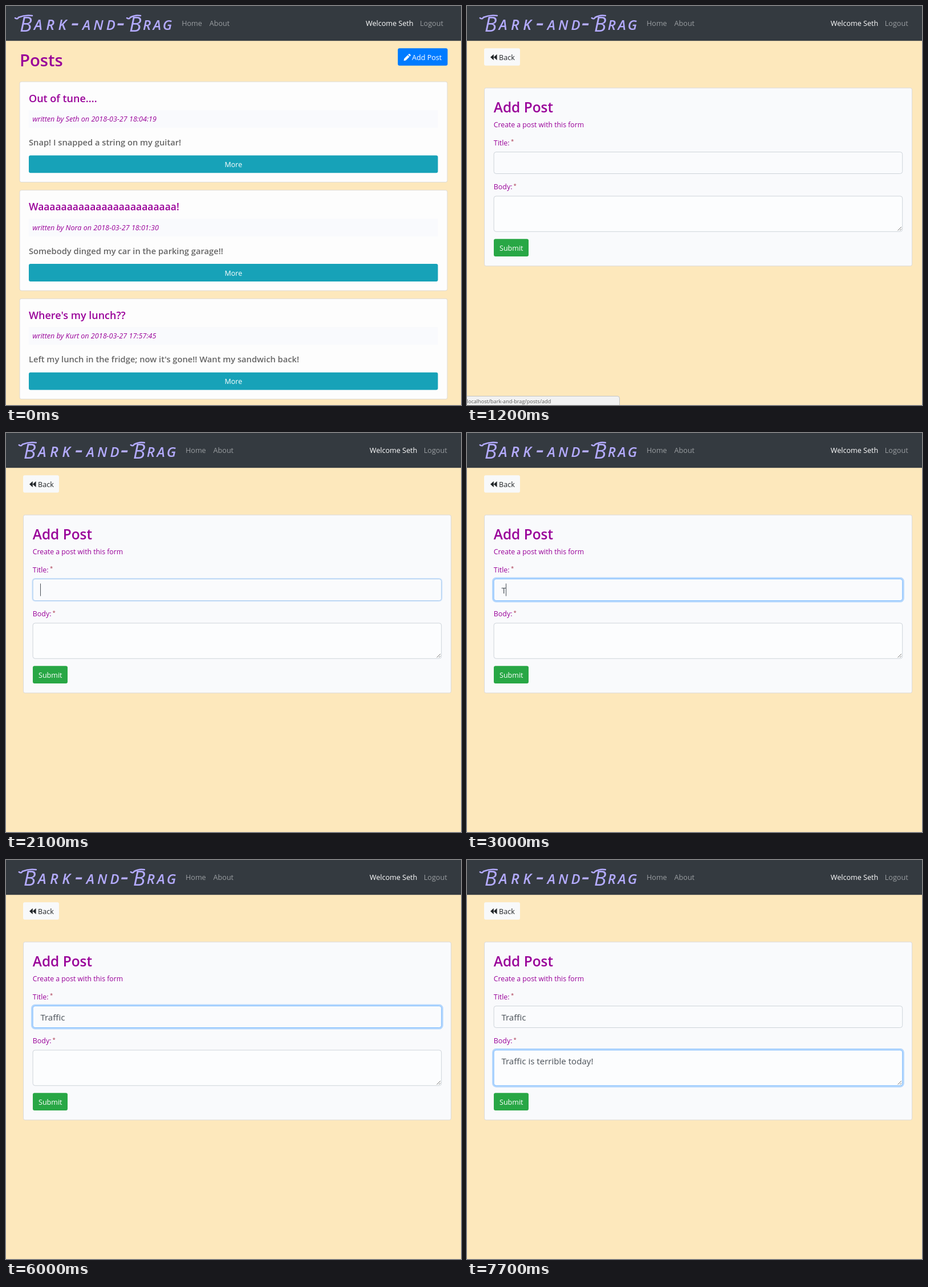
Write an HTML page that moves like this. It is 798 px wide and 701 px high and loops after 8 s.

```html
<!DOCTYPE html>
<html lang="en">
<head>
<meta charset="utf-8">
<title>Posts</title>
<style>
  html, body { margin: 0; width: 100%; height: 100%; overflow: hidden; background: #fde8bc; }
  svg { display: block; width: 100vw; height: 100vh; }
  text { font-family: "Open Sans", "Noto Sans", sans-serif; font-variant-ligatures: none; white-space: pre; }
</style>
</head>
<body>
<svg id="stage" viewBox="0 0 798 701"></svg>
<script>
const PURPLE = '#990099', WHITE = '#fff', INK = '#495057';
const LOOP = 8000, STEP = 100;

const rect = (x, y, w, h, fill, r = 0, more = '') =>
  `<rect x="${x}" y="${y}" width="${w}" height="${h}" rx="${r}" fill="${fill}" ${more}/>`;
const text = (x, y, size, fill, str, more = '') =>
  `<text x="${x}" y="${y}" font-size="${size}" fill="${fill}" ${more}>${str}</text>`;
const bold = 'font-weight="600"';

function brand() {
  const part = (x, y, size, gap, str, weight = 600) =>
    `<tspan x="${x}" y="${y}" font-size="${size}" letter-spacing="${gap}" font-weight="${weight}">${str}</tspan>`;
  const swash = (x, y, w) =>
    `<path d="M${x} ${y + 4}q4 3 6 -1q${w / 2} -5 ${w} -3" fill="none" stroke="#b4abff" stroke-width="2.6" stroke-linecap="round"/>`;
  return `<text fill="#b4abff" font-style="italic">` +
    part(24, 45, 36, 0, 'B', 400) + part(49, 42, 25, 6.5, 'ARK') + part(114, 45, 46, 0, '-', 400) +
    part(134, 42, 24, 5, 'AND') + part(194, 45, 46, 0, '-', 400) +
    part(216, 45, 36, 0, 'B', 400) + part(240, 42, 24, 3.5, 'RAG') + '</text>' +
    swash(16, 17, 24) + swash(212, 17, 18);
}

function nav() {
  const link = (x, str, fill = '#999da0') => text(x, 35, 12.6, fill, str);
  return brand() + link(308.2, 'Home') + link(356.8, 'About') +
    link(631, 'Welcome Seth', WHITE) + link(726, 'Logout');
}

function card(i, title, size, meta, body) {
  return `<g transform="translate(0 ${i * 190.6})">` +
    rect(24, 133, 750, 176.5, '#fdfdfd', 3, 'stroke="#dfdbd3"') +
    text(40, 168.5, size, PURPLE, title, bold) +
    rect(40, 183, 717.5, 31, '#f9fafd') +
    text(46.4, 203, 12.6, PURPLE, 'written by ' + meta, 'font-style="italic"') +
    text(40, 245, 14.7, '#666', body, bold) +
    rect(40, 262.5, 717.5, 30.8, '#17a2b8', 3) +
    text(398.8, 283, 12.5, WHITE, 'More', 'text-anchor="middle"') + '</g>';
}

function listPage() {
  const pencil = '<path d="M697.5 96.3l.8 -3.9l6.2 -6.2l3.1 3.1l-6.2 6.2zM705.3 85.4l1.2 -1.2q.8 -.6 1.5 0l1.6 1.6q.6 .8 0 1.5l-1.2 1.2z" fill="#fff"/>';
  return text(24, 106, 29.2, PURPLE, 'Posts', bold) +
    rect(687.2, 74.2, 87.3, 30.6, '#007bff', 3, 'id="add"') +
    pencil + text(712, 94.8, 12.6, WHITE, 'Add Post') +
    card(0, 'Out of tune....', 18, 'Seth on 2018-03-27 18:04:19', 'Snap! I snapped a string on my guitar!') +
    card(1, 'W' + 'a'.repeat(24) + '!', 17.45, 'Nora on 2018-03-27 18:01:30', 'Somebody dinged my car in the parking garage!!') +
    card(2, "Where's my lunch??", 18, 'Kurt on 2018-03-27 17:57:45', "Left my lunch in the fridge; now it's gone!! Want my sandwich back!");
}

function field(id, y, h, fill) {
  return rect(47.1, y, 716.6, h, fill, 4, `id="${id}Ring" stroke="#007bff"`) +
    rect(47.1, y, 716.6, h, fill, 4, `id="${id}Box"`) +
    text(60.4, y + 25.3, 15.1, INK, '', `id="${id}Text"`) +
    rect(60, y + 8, 1, 22, INK, 0, `id="${id}Caret"`);
}

function formPage() {
  const star = (x, y) => text(x, y, 9.5, '#a8324a', '*');
  return rect(30, 74.2, 63, 30.6, '#f8f9fa', 3) +
    '<path d="M46.8 84.8v10.4l-5.8 -5.2zM52.6 84.8v10.4l-5.8 -5.2z" fill="#212529"/>' +
    text(56, 94.8, 12.6, '#212529', 'Back') +
    rect(30.5, 144, 750, 312.8, '#f9fafc', 3, 'stroke="#dcdad8"') +
    text(46.8, 186.5, 24.4, PURPLE, 'Add Post', bold) +
    text(46.8, 212.5, 12.25, PURPLE, 'Create a post with this form') +
    text(46.8, 244.5, 12.4, PURPLE, 'Title:') + star(77, 241) +
    field('title', 256.5, 38, '#fafbfd') +
    text(46.8, 322, 12.4, PURPLE, 'Body:') + star(81.5, 318.5) +
    field('body', 334, 62.3, '#fcfdfe') +
    '<path d="M755.5 394.5l6.5 -6.5m-2.8 6.5l2.8 -2.8" stroke="#777" fill="none"/>' +
    rect(47, 409.3, 61, 30.6, '#28a745', 3) +
    text(57, 430, 12.55, WHITE, 'Submit');
}

document.getElementById('stage').innerHTML =
  rect(0, 0, 798, 701, '#fde8bc') + rect(0, 0, 798, 61.2, '#343a40') +
  `<g id="nav">${nav()}</g><g id="list">${listPage()}</g><g id="form">${formPage()}</g>` +
  '<g id="status"><path d="M-1 685.5H264q3.5 0 3.5 3.5V702H-1z" fill="#f2f2f2" stroke="#c4c4c4"/>' +
  text(-0.4, 698, 9.1, '#5a5a5a', 'localhost/bark-and-brag/posts/add') + '</g>';

const $ = id => document.getElementById(id);
const set = (id, attrs) => { for (const k in attrs) $(id).setAttribute(k, attrs[k]); };
const clamp = v => Math.max(0, Math.min(1, v));
const mix = (a, b, k) => `rgb(${a.map((v, i) => Math.round(v + (b[i] - v) * k))})`;
const show = (id, on) => set(id, { visibility: on ? 'visible' : 'hidden' });

// Last value whose start time has passed.
const at = (keys, t) => keys.reduce((v, [start, next]) => t >= start ? next : v, keys[0][1]);

const TITLE = [[0, ''], [3000, 'T'], [3200, 'Tr'], [3300, 'Tra'], [3600, 'Traf'],
  [3700, 'Traff'], [4200, 'Traffi'], [4500, 'Traffic']];
const BODY = [[0, ''], [7200, 'Traffic is terrible today! ']];
const TITLE_CARET = [[0, 0], [2100, 1], [2600, 0], [3000, 1], [5000, 0], [5500, 1], [6000, 0]];
const BODY_CARET = [[0, 0], [6100, 1], [6500, 0], [7000, 1], [7700, 0]];
const STATUS = [[0, 0], [900, .35], [1000, .8], [1100, 1], [1400, .7], [1500, .35], [1600, 0]];

function drawField(id, focus, str, caret, open) {
  set(id + 'Ring', { 'stroke-width': 1 + 5.2 * focus, 'stroke-opacity': .28 * focus });
  set(id + 'Box', { stroke: mix([206, 212, 218], [128, 189, 255], focus) });
  const label = $(id + 'Text');
  if (label.textContent !== str) label.textContent = str;
  set(id + 'Caret', { x: Math.round(60 + (str ? label.getComputedTextLength() : 0)) });
  show(id + 'Caret', open && caret);
}

function draw(ms) {
  const t = Math.floor(ms / STEP) * STEP;
  const open = t >= 1200;
  show('list', !open);
  show('form', open);
  set('nav', { transform: `translate(${open ? 6.8 : 0} 0)` });
  set('status', { opacity: at(STATUS, t) });

  const hover = clamp((t - 500) / 200), press = clamp((t - 900) / 200);
  set('add', {
    fill: press ? mix([0, 105, 217], [0, 98, 204], press) : mix([0, 123, 255], [0, 105, 217], hover),
    stroke: '#007bff', 'stroke-opacity': .5 * press, 'stroke-width': 5.2 * press, 'paint-order': 'stroke'
  });

  const toTitle = clamp((t - 2000) / 200), toBody = clamp((t - 6000) / 200);
  drawField('title', toTitle * (1 - toBody), at(TITLE, t), at(TITLE_CARET, t), open);
  drawField('body', toBody, at(BODY, t), at(BODY_CARET, t), open);
}

const begin = performance.now();
function tick() {
  draw((performance.now() - begin) % LOOP);
  requestAnimationFrame(tick);
}
tick();
</script>
</body>
</html>
```
